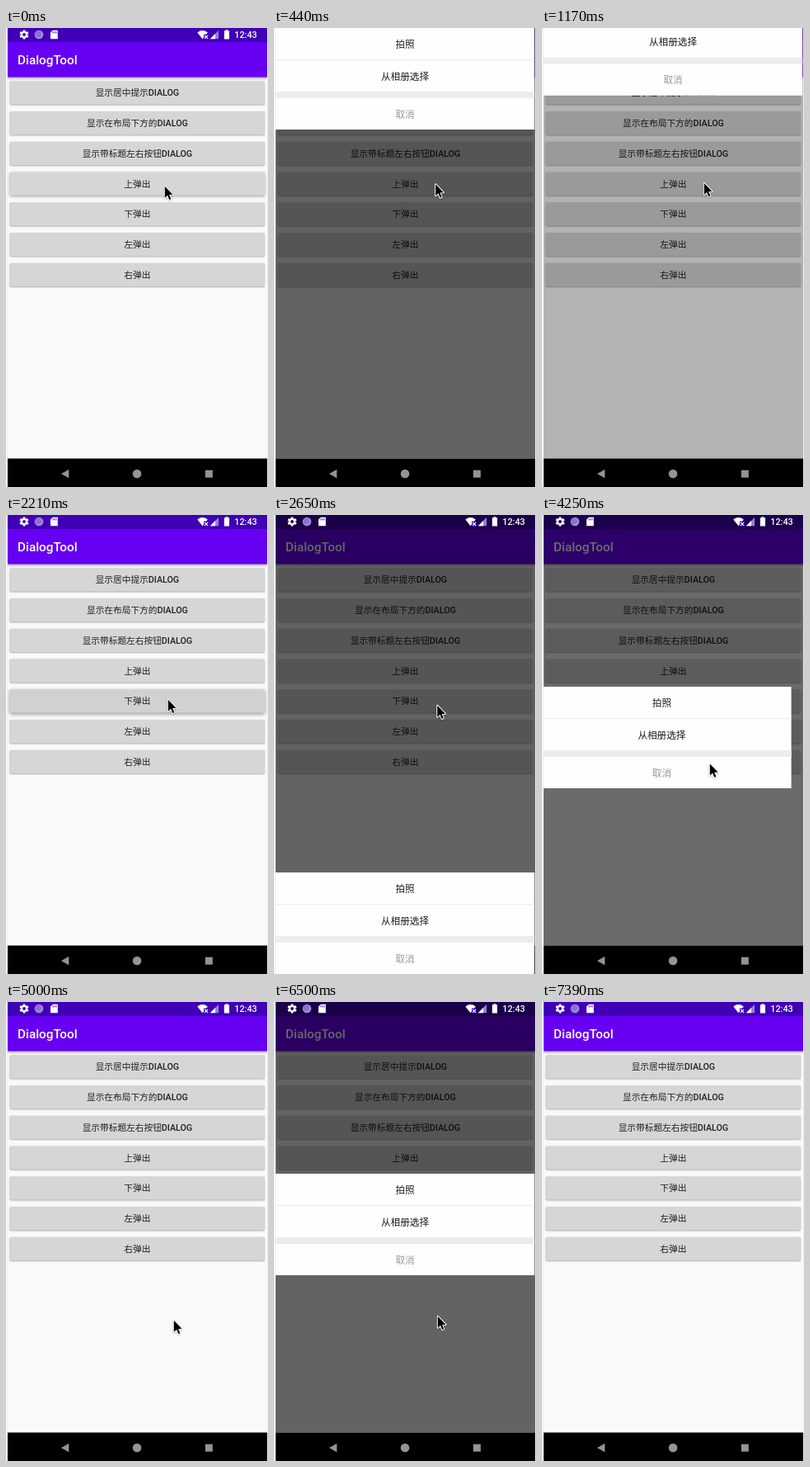
Write an HTML page with a canvas that moves like this. It is 318 px wide and 556 px high and loops after 7.54 s.

```html
<!DOCTYPE html>
<html lang="zh-CN">
<head>
<meta charset="utf-8">
<title>DialogTool</title>
<style>
html, body { margin: 0; width: 100%; height: 100%; overflow: hidden; background: #fff; }
canvas { display: block; width: 318px; height: 556px; }
</style>
</head>
<body>
<canvas id="stage"></canvas>
<script>
const W = 318, H = 556, LEFT = 2, RIGHT = 317, NAV = 521.5, MID = 159;
const LOOP = 7540, SHEET_H = 123, SHEET_Y = 208, DIM = 0.6;
const FONT = 'Roboto, "Noto Sans CJK SC", "Noto Sans CJK", sans-serif';

const canvas = document.getElementById('stage');
const ctx = canvas.getContext('2d');
const ratio = window.devicePixelRatio || 1;
canvas.width = W * ratio;
canvas.height = H * ratio;

const labels = ['显示居中提示DIALOG', '显示在布局下方的DIALOG', '显示带标题左右按钮DIALOG',
  '上弹出', '下弹出', '左弹出', '右弹出'];

// press / enter / exit times; dx, dy: direction the sheet hides in
const sheets = [
  { button: 3, press: -70, enter: 120, exit: 1086, x: 0, y: 0, dx: 0, dy: -SHEET_H },
  { button: 4, press: 2060, enter: 2260, exit: 3209, x: 0, y: H - SHEET_H, dx: 0, dy: SHEET_H },
  { button: 5, press: 3690, enter: 3880, exit: 4620, x: 0, y: SHEET_Y, dx: -315, dy: 0 },
  { button: 6, press: 5360, enter: 5550, exit: 6527, x: 0, y: SHEET_Y, dx: 315, dy: 0 }
];

// pointer path: time, x, y
const path = [
  [0, 192, 191], [600, 196, 188], [1320, 196, 187], [2000, 196, 223], [2500, 196, 223],
  [3000, 203, 256], [3900, 203, 256], [4450, 203, 385], [5000, 203, 385], [5350, 200, 294],
  [5700, 200, 294], [6200, 198, 380], [6500, 198, 380], [6800, 198, 387], [6950, 200, 398],
  [7100, 236, 470], [7250, 281, 540], [7390, 305, 580], [LOOP, 305, 580]
];

const clamp = v => Math.max(0, Math.min(1, v));
const smooth = v => v * v * (3 - 2 * v);

function snap(t) {
  if (t < 4995) return Math.floor((t + 10) * 34 / 5000) * 5000 / 34;
  return 5000 + Math.floor((t - 4990) / 150) * 150;
}

function rect(x, y, w, h, color) {
  ctx.fillStyle = color;
  ctx.fillRect(x, y, w, h);
}

function poly(points, color) {
  ctx.beginPath();
  points.forEach(([x, y]) => ctx.lineTo(x, y));
  ctx.closePath();
  ctx.fillStyle = color;
  ctx.fill();
}

function disc(x, y, r, color) {
  ctx.beginPath();
  ctx.arc(x, y, r, 0, Math.PI * 2);
  ctx.fillStyle = color;
  ctx.fill();
}

function text(str, x, y, size, color, weight = 400, align = 'center') {
  ctx.font = `${weight} ${size}px ${FONT}`;
  ctx.textAlign = align;
  ctx.textBaseline = 'alphabetic';
  ctx.fillStyle = color;
  ctx.fillText(str, x, y);
}

function shadow(alpha, blur, dy) {
  ctx.shadowColor = `rgba(0,0,0,${alpha})`;
  ctx.shadowBlur = blur * ratio;
  ctx.shadowOffsetY = dy * ratio;
}

function pressure(i, t) {
  const s = sheets.find(s => s.button === i);
  if (!s) return 0;
  return clamp((t - s.press) / 140) * (1 - clamp((t - s.enter - 60) / 280));
}

function button(i, t) {
  const y = 64.2 + i * 36.75, p = pressure(i, t);
  const g = Math.round(214 - 5 * Math.max(0, p * 2 - 1));
  ctx.save();
  shadow(0.3 + 0.1 * p, 1.8 + 3.5 * p, 0.9 + 0.9 * p);
  ctx.beginPath();
  ctx.roundRect(4.5, y, 309.5, 28.3, 1.6);
  ctx.fillStyle = `rgb(${g},${g},${g})`;
  ctx.fill();
  ctx.restore();
  text(labels[i], MID + 0.4, y + 18.2, 10.7, '#202020', 500);
}

function page(t) {
  rect(LEFT, 0, RIGHT - LEFT, NAV, '#f9f9f9');
  labels.forEach((_, i) => button(i, t));
  ctx.save();
  shadow(0.35, 3, 1.2);
  rect(LEFT, 17, RIGHT - LEFT, 42.5, '#6700f3');
  ctx.restore();
  rect(LEFT, 0, RIGHT - LEFT, 17, '#3f00b6');
  text('DialogTool', 14, 44.3, 15.3, '#fff', 500, 'left');
}

function gear(x, y) {
  ctx.save();
  ctx.translate(x, y);
  for (let i = 0; i < 6; i++) {
    ctx.rotate(Math.PI / 3);
    rect(-1.4, -5.6, 2.8, 3, '#fff');
  }
  ctx.restore();
  ctx.beginPath();
  ctx.arc(x, y, 3.1, 0, Math.PI * 2);
  ctx.lineWidth = 2.4;
  ctx.strokeStyle = '#fff';
  ctx.stroke();
}

function statusIcons() {
  gear(22, 8);
  disc(40, 8, 5.3, '#a58bdc');
  disc(39.3, 7.3, 3.6, '#8c70cd');
  poly([[56.8, 2.8], [62.8, 2.8], [62.8, 13.3], [54, 13.3], [54, 5.6]], '#fff');
  [57, 59, 61].forEach(x => rect(x - 0.4, 4.2, 0.9, 2.2, '#3f00b6'));

  ctx.beginPath();
  ctx.moveTo(238.5, 13.3);
  ctx.lineTo(232.3, 5.4);
  ctx.quadraticCurveTo(238.5, 0.6, 244.8, 5.4);
  ctx.closePath();
  ctx.fillStyle = '#fff';
  ctx.fill();
  rect(240, 7.6, 6, 6, '#3f00b6');
  ctx.beginPath();
  ctx.moveTo(241, 8.8); ctx.lineTo(245, 12.8);
  ctx.moveTo(245, 8.8); ctx.lineTo(241, 12.8);
  ctx.lineWidth = 1.2;
  ctx.strokeStyle = '#fff';
  ctx.stroke();

  poly([[258, 3], [258, 13.2], [247.8, 13.2]], '#9a80d6');
  poly([[254, 7], [254, 13.2], [247.8, 13.2]], '#fff');
  rect(264.8, 3.3, 6.2, 10.2, '#fff');
  rect(266.5, 2.2, 2.8, 1.4, '#fff');
  text('12:43', 277.3, 12, 10.8, '#fff', 500, 'left');
}

function navBar() {
  rect(LEFT, NAV, RIGHT - LEFT, H - NAV, '#000');
  const c = '#949494';
  poly([[67, 540], [76.3, 534.8], [76.3, 545.2]], c);
  disc(159, 540, 5.3, c);
  rect(241.8, 535.6, 9, 9, c);
}

function sheet(x, y) {
  ctx.save();
  ctx.translate(x, y);
  rect(LEFT, 0, 314.2, SHEET_H, '#fefefe');
  rect(LEFT, 38, 314.2, 1, '#ececec');
  rect(LEFT, 77, 314.2, 8, '#ececec');
  text('拍照', MID, 23.5, 11.6, '#1c1c1c');
  text('从相册选择', MID, 62.5, 11.6, '#1c1c1c');
  text('取消', MID, 108.5, 11.6, '#999');
  ctx.restore();
}

// hidden: 0 fully in, 1 fully out; dim: strength of the scrim
function sheetState(s, t) {
  if (t < s.exit) {
    const x = clamp((t - s.enter) / 300);
    return { hidden: (1 - x) ** 2, dim: clamp((t - s.enter) / 250) };
  }
  const x = clamp((t - s.exit) / 270);
  return { hidden: x, dim: 1 - clamp(0.11 + 1.25 * x) };
}

function pointer(t) {
  const i = Math.max(1, path.findIndex(k => k[0] > t));
  const [t0, x0, y0] = path[i - 1], [t1, x1, y1] = path[i];
  const k = smooth((t - t0) / (t1 - t0));
  ctx.save();
  ctx.translate(x0 + (x1 - x0) * k + 0.8, y0 + (y1 - y0) * k + 0.8);
  shadow(0.3, 2, 0.8);
  ctx.lineJoin = 'round';
  ctx.lineWidth = 2;
  ctx.strokeStyle = '#fff';
  ctx.beginPath();
  [[0, 0], [0, 14], [3.3, 11], [5.4, 16.3], [7.5, 15.4], [5.3, 10.3], [9.7, 10]]
    .forEach(([x, y]) => ctx.lineTo(x, y));
  ctx.closePath();
  ctx.stroke();
  ctx.shadowColor = 'transparent';
  ctx.fillStyle = '#000';
  ctx.fill();
  ctx.restore();
}

function draw(t) {
  ctx.setTransform(ratio, 0, 0, ratio, 0, 0);
  rect(0, 0, W, H, '#fff');
  rect(1, 0, 1, H, '#ededed');
  rect(317, 0, 1, H, '#ededed');
  ctx.save();
  ctx.beginPath();
  ctx.rect(LEFT, 0, RIGHT - LEFT, H);
  ctx.clip();
  page(t);
  const active = sheets.find(s => t > s.enter && t < s.exit + 270);
  const state = active && sheetState(active, t);
  if (active) rect(LEFT, 0, RIGHT - LEFT, NAV, `rgba(0,0,0,${DIM * state.dim})`);
  statusIcons();
  navBar();
  if (active) sheet(active.x + active.dx * state.hidden, active.y + active.dy * state.hidden);
  pointer(t);
  ctx.restore();
}

const start = performance.now();
function tick(now) {
  draw(snap(Math.max(0, now - start) % LOOP));
  requestAnimationFrame(tick);
}
tick(start);
</script>
</body>
</html>
```
